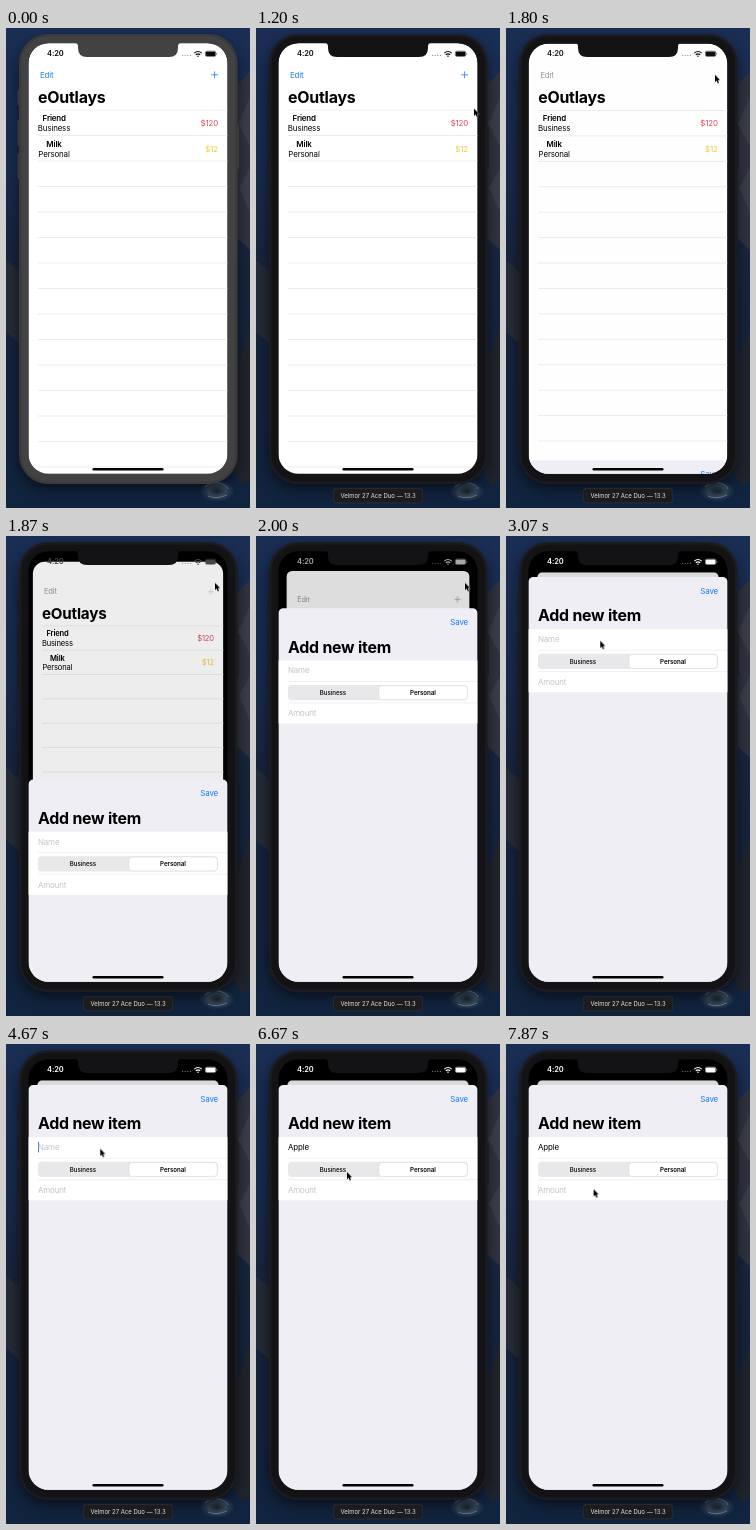
Animation of 244 by 480 pixels, one loop 8000 ms. Source, as an HTML page:

```html
<!DOCTYPE html>
<html lang="en">
<head>
<meta charset="utf-8">
<title>Expense list</title>
<style>
  @property --p { syntax: "<number>"; inherits: true; initial-value: 0; }

  html, body { margin: 0; width: 100%; height: 100%; overflow: hidden; background: #10203a; }
  svg { display: block; width: 100vw; height: 100vh; }
  text { font: 7.95px Inter, "Liberation Sans", sans-serif; letter-spacing: -.17px; }
  .title { font-size: 15.9px; font-weight: 700; letter-spacing: -.22px; }
  .bold { font-weight: 600; }
  .mid { text-anchor: middle; }
  .end { text-anchor: end; }
  .hint { fill: #c4c4c8; }
  .seg { font-size: 6.2px; font-weight: 500; letter-spacing: -.05px; }

  .screen, .rim, .bezel, .label, .status, .nav, .plus, .pointer,
  .typed, .name-hint, .caret1, .caret2 {
    animation: 8s linear infinite;
  }

  /* window focus */
  .rim { animation-name: rim; animation-timing-function: step-end; }
  .bezel { animation-name: bezel; animation-timing-function: step-end; }
  .label { animation-name: label; animation-timing-function: step-end; }
  @keyframes rim { 0% { fill: #3b3b3c } 3.375%, 100% { fill: #1c1c20 } }
  @keyframes bezel { 0% { fill: #424243 } 3.375%, 100% { fill: #131316 } }
  @keyframes label { 0% { opacity: 0 } 3.375%, 100% { opacity: 1 } }

  /* sheet: critically damped spring, --p runs from 0 to 1 */
  .screen { animation-name: spring; }
  @keyframes spring {
    0%, 22.325% { --p: 0 }
    22.5% { --p: .027 }
    22.91% { --p: .238 }
    23.33% { --p: .475 }
    23.75% { --p: .657 }
    24.17% { --p: .785 }
    24.58% { --p: .87 }
    25% { --p: .922 }
    25.83% { --p: .974 }
    26.67% { --p: .992 }
    28.75%, 100% { --p: 1 }
  }
  .card {
    transform-origin: 122px 15px;
    transform: translateY(calc(var(--p) * 21.6px)) scale(calc(1 - .09 * var(--p)));
  }
  .paper, .dim { rx: calc(20px - 15px * var(--p)); }
  .dim { opacity: calc(.145 * var(--p)); }
  .sheet { transform: translateY(calc((1 - var(--p)) * 405px)); }

  .nav { color: #1a7df0; animation-name: nav; transform: translateY(calc(var(--p) * -.8px)); }
  @keyframes nav {
    0%, 22.1% { color: #1a7df0 }
    22.4%, 100% { color: #98989e }
  }
  .plus { animation-name: plus; }
  @keyframes plus {
    0%, 20% { opacity: 1 }
    20.8%, 22.5% { opacity: .15 }
    25%, 100% { opacity: 1 }
  }
  .status { animation-name: status; }
  @keyframes status {
    0%, 22.4% { color: #0a0a0a }
    25% { color: #a8a8a8 }
    27.5%, 100% { color: #fff }
  }

  /* typing: the cover and caret advance one letter at a time */
  .typed { animation-name: typed; animation-timing-function: step-end; }
  @keyframes typed {
    0% { transform: translateX(0) }
    63.375% { transform: translateX(5.3px) }
    67.5% { transform: translateX(10.1px) }
    68.375% { transform: translateX(14.9px) }
    70.875% { transform: translateX(16.8px) }
    72.5%, 100% { transform: translateX(21.6px) }
  }
  .name-hint { animation-name: hint; animation-timing-function: step-end; }
  @keyframes hint { 0% { opacity: 1 } 63.375%, 100% { opacity: 0 } }

  .caret1, .caret2 { fill: #4470e6; }
  .caret1 { animation-name: blink1; }
  .caret2 { animation-name: blink2; }
  @keyframes blink1 {
    0%, 42.5% { opacity: 0 }
    44.125%, 50.875% { opacity: 1 }
    53.375%, 57.5% { opacity: 0 }
    58.375%, 80% { opacity: 1 }
    82%, 100% { opacity: 0 }
  }
  @keyframes blink2 {
    0%, 89.125% { opacity: 0 }
    90%, 96.5% { opacity: 1 }
    98.375%, 100% { opacity: .15 }
  }

  .pointer { animation-name: move; animation-timing-function: ease-in-out; }
  @keyframes move {
    0%, 8.375% { transform: translate(247px, 190px) }
    18.375%, 31.625% { transform: translate(209px, 46.8px) }
    35.5% { transform: translate(118px, 128px) }
    38.375%, 80% { transform: translate(94.2px, 104.7px) }
    83.375% { transform: translate(91px, 128px); animation-timing-function: ease-out }
    90%, 100% { transform: translate(87.6px, 145.2px) }
  }
</style>
</head>
<body>
<svg viewBox="0 0 244 480" preserveAspectRatio="none">
  <defs>
    <linearGradient id="sea" x1="0" y1="0" x2="0" y2="1">
      <stop offset="0" stop-color="#1a2e54"/>
      <stop offset=".3" stop-color="#182b4d"/>
      <stop offset=".5" stop-color="#17253c"/>
      <stop offset=".75" stop-color="#13243e"/>
      <stop offset="1" stop-color="#11243f"/>
    </linearGradient>
    <radialGradient id="foam">
      <stop offset="0" stop-color="#1a2430"/>
      <stop offset=".5" stop-color="#3c4c5c" stop-opacity=".9"/>
      <stop offset="1" stop-color="#2c4460" stop-opacity="0"/>
    </radialGradient>
    <filter id="soft" x="-20%" y="-20%" width="140%" height="140%"><feGaussianBlur stdDeviation="7"/></filter>
    <pattern id="rows" x="32" y="81.5" width="190" height="25.5" patternUnits="userSpaceOnUse">
      <rect width="190" height=".6" fill="#dedee1"/>
    </pattern>
    <clipPath id="glass"><rect x="22.4" y="15.2" width="199.2" height="430.6" rx="20"/></clipPath>
  </defs>

  <!-- wallpaper -->
  <rect width="244" height="480" fill="url(#sea)"/>
  <path d="M244 44 226 62V205L244 222Z" fill="#30343f"/>
  <path d="M244 70 232 96 244 118ZM244 140 233 160 244 184Z" fill="#3b3f49"/>
  <path d="M244 300 226 350V440L236 458 244 452Z" fill="#20242d"/>
  <path d="M0 232 16 246V318L0 304Z" fill="#252d39"/>
  <ellipse cx="211" cy="463" rx="18" ry="11" fill="url(#foam)"/>
  <path d="M199 459q6-6 14-4t9 6M202 468q8 4 19-1" fill="none" stroke="#8496a6" stroke-width=".9" opacity=".7"/>
  <rect x="12" y="12" width="220" height="450" rx="30" opacity=".5" filter="url(#soft)"/>

  <!-- phone body -->
  <g class="rim">
    <rect x="11.6" y="62" width="3" height="15" rx="1"/>
    <rect x="11.6" y="92" width="3" height="26" rx="1"/>
    <rect x="11.6" y="125" width="3" height="26" rx="1"/>
    <rect x="230" y="98" width="3" height="43" rx="1"/>
    <rect x="13" y="6" width="218.6" height="450" rx="29"/>
  </g>
  <rect class="bezel" x="15.5" y="8.5" width="213.6" height="445" rx="26.5"/>

  <g class="screen" clip-path="url(#glass)">
    <rect x="22" y="15" width="200" height="431" fill="#000"/>

    <g class="card">
      <rect class="paper" x="22.4" y="15" width="199.2" height="460" fill="#fff"/>
      <g class="nav">
        <text x="34" y="49.6" fill="currentColor">Edit</text>
        <path class="plus" d="M205.2 46.8h6.8M208.6 43.4v6.8" stroke="currentColor" stroke-width=".8"/>
      </g>
      <text class="title" x="32" y="74.6">eOutlays</text>
      <rect x="32" y="81.5" width="190" height="364" fill="url(#rows)"/>
      <text class="bold mid" x="48.2" y="93">Friend</text>
      <text class="mid" x="48" y="103">Business</text>
      <text class="end" x="212" y="98" fill="#dc4557">$120</text>
      <text class="bold mid" x="48" y="118.5">Milk</text>
      <text class="mid" x="48" y="128.5">Personal</text>
      <text class="end" x="212" y="123.5" fill="#f0cb35">$12</text>
      <rect class="dim" x="22.4" y="15" width="199.2" height="460"/>
    </g>

    <g class="sheet">
      <rect x="22.4" y="41" width="199.2" height="430" rx="5" fill="#efeef5"/>
      <text class="end" x="212" y="57.6" fill="#0f7cf5">Save</text>
      <text class="title" x="32" y="85.3">Add new item</text>
      <rect x="22" y="93.2" width="200" height="63" fill="#fff"/>
      <path d="M32 114.2H222M32 135.6H222" stroke="#e0e0e4" stroke-width=".5"/>

      <text x="32" y="106.2">Apple</text>
      <g class="typed">
        <rect x="32" y="96" width="26" height="14" fill="#fff"/>
        <rect class="caret1" x="32" y="98" width="1" height="10.4"/>
      </g>
      <text class="hint name-hint" x="32" y="106.2">Name</text>

      <rect x="32" y="117.8" width="180" height="15.2" rx="4" fill="#e8e8ea"/>
      <rect x="122.8" y="118.4" width="88.6" height="14" rx="3.5" fill="#fff" stroke="#d2d2d6" stroke-width=".5"/>
      <text class="seg mid" x="77" y="127.7">Business</text>
      <text class="seg mid" x="167" y="127.7" style="font-weight:600">Personal</text>

      <text class="hint" x="32" y="149">Amount</text>
      <rect class="caret2" x="32" y="141" width="1" height="10.4"/>
    </g>

    <g class="status" fill="currentColor">
      <text x="41" y="28.4" fill="currentColor" style="font-size:7.5px;font-weight:600;letter-spacing:-.1px">4:20</text>
      <path d="M176.6 27.4h9" stroke="currentColor" stroke-width="1.2" stroke-linecap="round" stroke-dasharray="0 2.6" opacity=".45"/>
      <path d="M188.3 25.1q3.7-3.2 7.4 0M189.8 26.8q2.2-1.9 4.4 0" fill="none" stroke="currentColor" stroke-width="1.2"/>
      <path d="M190.9 27.9q1.1-.9 2.2 0L192 29.1Z"/>
      <rect x="199.4" y="23.2" width="10.4" height="5.2" rx="1.5" fill="none" stroke="currentColor" stroke-width=".7" opacity=".8"/>
      <rect x="199.9" y="23.7" width="9.4" height="4.2" rx=".9"/>
      <rect x="210.5" y="25" width=".7" height="1.7" rx=".3" opacity=".6"/>
    </g>

    <rect x="86.5" y="440" width="71" height="2.4" rx="1.2" fill="#000"/>
  </g>

  <path class="bezel" d="M68.5 14.5Q72 15 72 18.5V20Q72 29 81 29H163Q172 29 172 20V18.5Q172 15 175.5 14.5Z"/>

  <g class="label">
    <rect x="77.3" y="460.3" width="89.4" height="14.6" rx="3" fill="#1c1c1f" stroke="#38383c" stroke-width=".6"/>
    <text class="mid" x="122" y="469.7" fill="#e4e4e6" style="font-size:6px;letter-spacing:0">Velmor 27 Ace Duo — 13.3</text>
  </g>

  <path class="pointer" d="M0 0V7.2L1.6 5.7 2.8 8.4 4 7.9 2.9 5.3 5.1 5.2Z" stroke="#fff" stroke-width=".5" paint-order="stroke"/>
</svg>
</body>
</html>
```
